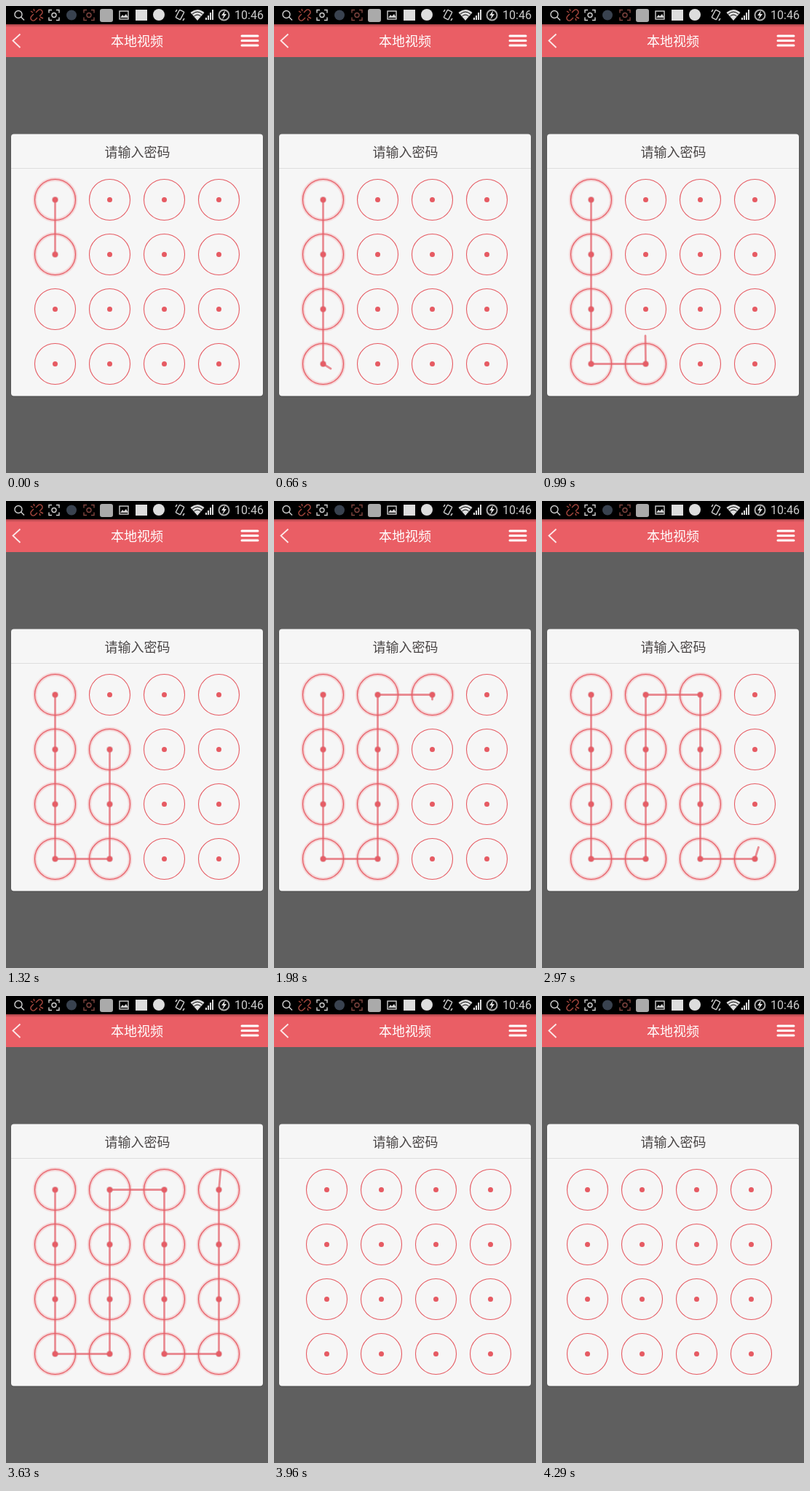
Recreate the animation shown at these times as an HTML page. Size 360 px wide and 640 px high, loop 4620 ms.

```html
<!DOCTYPE html>
<html lang="zh-CN">
<head>
<meta charset="utf-8">
<title>Pattern lock</title>
<style>
  html, body { margin: 0; width: 100%; height: 100%; overflow: hidden; background: #5f5f5f; }
  svg { display: block; width: 360px; height: 640px; }
  text { font: 18px "Noto Sans CJK SC", "Noto Sans CJK", sans-serif; text-anchor: middle; }
  .clock { font: 16px Roboto, sans-serif; }
  .icon { fill: none; stroke: #d0d0d0; stroke-width: 1.4; }
  .ring { fill: none; stroke: #e65b63; stroke-width: 1.1; }
  .dot { fill: #e65b63; }
  .glow { fill: none; stroke: #e8575f; }
  .halo { fill: #c8505a; opacity: .4; }
  .trail { fill: none; stroke: #e4606a; stroke-width: 2.8; stroke-opacity: .7; stroke-linecap: round; stroke-linejoin: round; }
</style>
</head>
<body>
<svg viewBox="0 0 360 640">
  <defs>
    <linearGradient id="shade" x2="0" y2="1">
      <stop stop-color="#000" stop-opacity=".3"/>
      <stop offset="1" stop-color="#000" stop-opacity="0"/>
    </linearGradient>
    <path id="corners" d="M-7 -3V-7H-3M3 -7H7V-3M7 3V7H3M-3 7H-7V3"/>
  </defs>
  <rect width="360" height="640" fill="#5f5f5f"/>

  <!-- status bar -->
  <rect width="360" height="25"/>
  <g class="icon">
    <circle cx="17" cy="11.500" r="5"/>
    <path d="M20.500 15L25 19.500"/>
    <g stroke="#a8483f">
      <path d="M41 9l3-3a3.300 3.300 0 0 1 5 5l-3 3M43 16l-3 3a3.300 3.300 0 0 1-5-5l3-3"/>
      <path d="M34 7l3 2M38 4l1 3M46 17l1 3M47 15l4 2"/>
    </g>
    <use href="#corners" x="66" y="12.500"/>
    <circle cx="66" cy="12.500" r="3"/>
    <g stroke="#80453f">
      <use href="#corners" x="114" y="12.500"/>
      <circle cx="114" cy="12.500" r="3"/>
    </g>
    <rect x="156" y="7" width="12" height="11"/>
    <path d="M157 16l3-4 2 2 3-3 3 5z" fill="#d0d0d0" stroke="none"/>
    <rect x="235.500" y="6" width="7" height="12" rx="1" transform="rotate(28 239 12)"/>
    <path d="M233 8l2-3M245 17l-2 3"/>
    <circle cx="299.500" cy="12.500" r="7" stroke="#aaa" stroke-width="2"/>
  </g>
  <circle cx="90" cy="12.500" r="7" fill="#39424f"/>
  <rect x="129" y="4" width="18" height="18" rx="3" fill="#aaa"/>
  <rect x="178" y="5" width="16" height="15" fill="#ddd"/>
  <circle cx="210" cy="12" r="8" fill="#ddd"/>
  <g fill="#ddd">
    <path d="M263 20L253.500 9Q263 1 272.500 9Z"/>
    <path d="M274 16h2v3h-2zM277 13h2v6h-2zM280 9h2v10h-2zM283 5h2v14h-2z"/>
    <path d="M301 6l-5 7h3l-2 6 6-8h-3z"/>
  </g>
  <path d="M256 11Q263 5 270 11M258.500 14Q263 10 267.500 14" fill="none" stroke="#000"/>
  <text class="clock" x="334" y="18.300" fill="#ccc">10:46</text>

  <!-- header -->
  <rect y="25" width="360" height="45" fill="#ea5e65"/>
  <rect y="25" width="360" height="4" fill="url(#shade)"/>
  <path d="M19.500 38.500L9.500 47.500L19.500 57" fill="none" stroke="#fce8e9" stroke-width="1.800"/>
  <path d="M324 41H346M324 47.500H346M324 54H346" stroke="#fff" stroke-width="3" stroke-linecap="round"/>
  <text x="180" y="54.500" fill="#fff">本地视频</text>

  <!-- dialog -->
  <rect x="6.500" y="176" width="347" height="360" rx="5" fill="#484848" opacity=".6"/>
  <rect x="7" y="175.500" width="346" height="359" rx="4" fill="#f6f6f6"/>
  <path d="M7 222.500H353" stroke="#dedede"/>
  <text x="180.500" y="206.700" fill="#4a4646">请输入密码</text>
  <g id="lock"></g>
</svg>
<script>
  const STEP = 330;
  // Each pose: rings joined, then the fingertip.
  const drag = [
    [2, 67.5, 340.5], [3, 67.5, 418], [4, 78, 497], [5, 142, 452],
    [7, 142.5, 340.5], [8, 143, 262], [9, 217.5, 272], [11, 220, 443],
    [12, 232, 489], [13, 297.5, 474.5], [16, 293, 287], [16, 295, 238]
  ];
  const shake = [5, -5];
  const total = drag.length + shake.length;
  const lock = document.getElementById("lock");

  // The pattern snakes down, up, down and up through the columns.
  const nodes = Array.from({ length: 16 }, (_, i) => {
    const col = i >> 2, row = col % 2 ? 3 - i % 4 : i % 4;
    return [67.5 + 75 * col, 265.5 + 75 * row];
  });

  const circle = (name, [x, y], r, extra = "") =>
    `<circle class="${name}" cx="${x}" cy="${y}" r="${r}" ${extra}/>`;

  function ring(p, active) {
    const glow = active
      ? circle("glow", p, 28, 'stroke-width="5.500" stroke-opacity=".16"') +
        circle("glow", p, 28, 'stroke-width="3" stroke-opacity=".2"') +
        circle("halo", p, 4.6)
      : "";
    return glow + circle("ring", p, 28) + circle("dot", p, 3.5);
  }

  function draw(step) {
    const [count, x, y] = drag[step] || [0];
    const shift = shake[step - drag.length] || 0;
    let art = nodes.map((p, i) => ring(p, i < count)).join("");
    if (count) {
      const points = [...nodes.slice(0, count), [x, y]];
      art += `<polyline class="trail" points="${points.join(" ")}"/>`;
    }
    lock.innerHTML = art;
    lock.setAttribute("transform", `translate(${shift} 0)`);
  }

  const start = performance.now();
  let shown = -1;
  function tick() {
    const step = Math.floor((performance.now() - start) / STEP) % total;
    if (step !== shown) draw(shown = step);
    requestAnimationFrame(tick);
  }
  tick();
</script>
</body>
</html>
```
